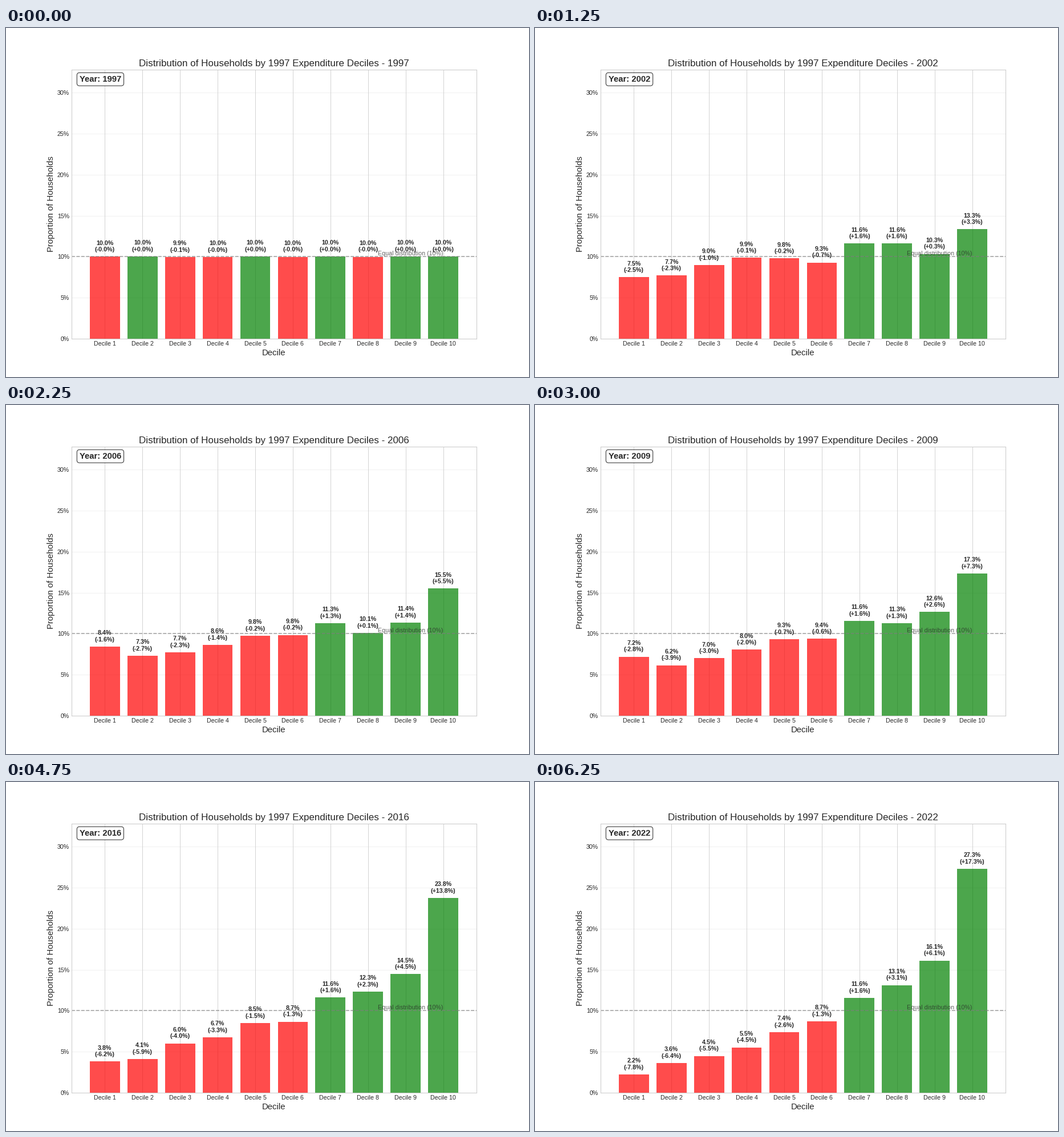
A matplotlib script for the animation above (6.5 s loop, 917 px wide and 611 px high).

```python
import matplotlib.pyplot as plt
import numpy as np
from matplotlib.animation import FuncAnimation
from matplotlib.ticker import PercentFormatter

W, H, DPI = 917, 611, 76.4
FIRST, LAST = 1997, 2022
EQUAL = 0.1

# Share of households per decile (%), at key years; linear in between.
KEYS = {
    1997: [9.99, 10.04, 9.95, 9.97, 10.02, 9.98, 10.01, 9.98, 10.01, 10.01],
    2000: [8.41, 8.00, 8.64, 10.16, 10.54, 8.78, 10.72, 10.54, 10.66, 13.50],
    2002: [7.48, 7.69, 8.96, 9.86, 9.79, 9.29, 11.60, 11.60, 10.33, 13.34],
    2006: [8.43, 7.32, 7.71, 8.62, 9.76, 9.84, 11.26, 10.11, 11.36, 15.50],
    2012: [5.96, 4.98, 6.28, 7.46, 8.90, 8.90, 11.87, 12.49, 13.92, 19.20],
    2016: [3.79, 4.08, 6.01, 6.74, 8.51, 8.66, 11.60, 12.33, 14.46, 23.77],
    2022: [2.23, 3.60, 4.48, 5.52, 7.36, 8.69, 11.56, 13.12, 16.12, 27.33],
}
years = list(KEYS)
table = np.array(list(KEYS.values())) / 100


def shares(year):
    return [np.interp(year, years, column) for column in table.T]


plt.style.use("seaborn-v0_8-whitegrid")
plt.rcParams["font.family"] = "Liberation Sans"

# The tiny surplus keeps the pixel size from rounding down.
fig, ax = plt.subplots(figsize=((W + 1e-4) / DPI, (H + 1e-4) / DPI), dpi=DPI)

deciles = [f"Decile {i}" for i in range(1, 11)]
bars = ax.bar(deciles, shares(FIRST), alpha=0.7)
labels = [ax.text(i, 0, "", ha="center", va="bottom", fontsize=10,
                  fontweight="bold") for i in range(10)]

ax.axhline(EQUAL, color="gray", linestyle="--", alpha=0.7)
ax.text(9, EQUAL, "Equal distribution (10%)", ha="right", va="bottom",
        fontsize=10, alpha=0.7)
stamp = ax.text(0.02, 0.98, "", transform=ax.transAxes, va="top",
                fontsize=14, fontweight="bold",
                bbox=dict(boxstyle="round,pad=0.3", facecolor="white",
                          edgecolor="black", alpha=0.8))

title = ax.set_title("", fontsize=16)
ax.set_xlabel("Decile", fontsize=14)
ax.set_ylabel("Proportion of Households", fontsize=14)
ax.set_ylim(0, table.max() * 1.2)
ax.yaxis.set_major_formatter(PercentFormatter(1, decimals=0))
ax.grid(axis="y", alpha=0.3)


def update(step):
    year = FIRST + step
    for bar, label, share in zip(bars, labels, shares(year)):
        change = share - EQUAL
        bar.set_height(share)
        bar.set_facecolor("green" if change >= 0 else "red")
        label.set_y(share + 0.005)
        label.set_text(f"{share:.1%}\n({change:+.1%})")
    title.set_text(
        f"Distribution of Households by 1997 Expenditure Deciles - {year}")
    stamp.set_text(f"Year: {year}")
    return [*bars, *labels, title, stamp]


anim = FuncAnimation(fig, update, frames=LAST - FIRST + 1, interval=250,
                     repeat=True, repeat_delay=0, blit=False)
plt.show()
```
